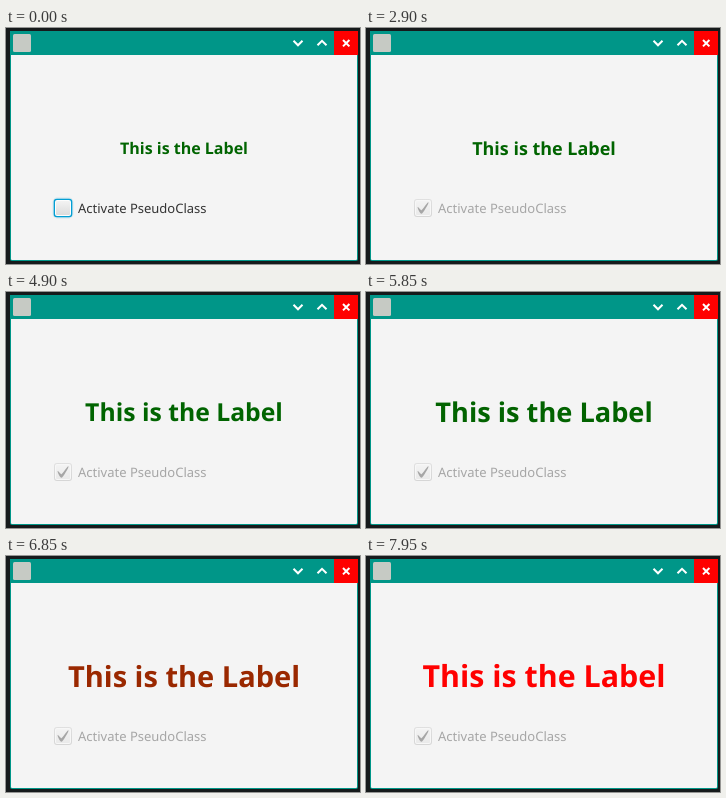
An HTML page that plays this animation: 354x236 px, repeating every 8 s.

```html
<!DOCTYPE html>
<html lang="en">
<head>
<meta charset="utf-8">
<title>Label transition</title>
<style>
  html, body { margin: 0; width: 100%; height: 100%; overflow: hidden; background: #161a1b; }
  svg { display: block; width: 100vw; height: 100vh; }
  text { font-family: "Noto Sans", "Open Sans", sans-serif; text-rendering: geometricPrecision; }
  #label { font-weight: 700; text-anchor: middle; }
  .caption { font-size: 13px; fill: #333; }
  .glyph { fill: none; stroke: #fff; stroke-width: 2; }
  .checked { opacity: .4; }
  .focus, .tick { display: none; }
  #check:not(.checked) .focus, .checked .tick { display: inline; }
</style>
</head>
<body>
<svg viewBox="0 0 354 236">
  <defs>
    <linearGradient id="edge" x2="0" y2="1">
      <stop stop-color="#c3c3c3"/><stop offset="1" stop-color="#a9a9a9"/>
    </linearGradient>
    <linearGradient id="face" x2="0" y2="1">
      <stop stop-color="#f3f3f3"/><stop offset="1" stop-color="#dcdcdc"/>
    </linearGradient>
  </defs>

  <!-- window -->
  <path d="M4 3H352V231a2 2 0 0 1-2 2H6a2 2 0 0 1-2-2z" fill="#009688"/>
  <path d="M5 27H351V231a1 1 0 0 1-1 1H6a1 1 0 0 1-1-1z" fill="#f4f4f4"/>
  <rect x="7" y="6" width="18" height="18" rx="1.5" fill="#c6cac4"/>
  <rect x="328" y="3" width="24" height="24" fill="#f00"/>
  <g class="glyph">
    <path d="M287.5 12.8l4.5 4.5 4.5-4.5"/>
    <path d="M311.5 17.3l4.5-4.5 4.5 4.5"/>
    <path d="M337 12l6.4 6.4M343.4 12L337 18.4"/>
  </g>

  <text id="label" x="178">This is the Label</text>

  <g id="check">
    <rect x="48" y="171" width="18" height="18" rx="3" fill="url(#edge)"/>
    <g class="focus">
      <rect x="46.6" y="169.6" width="20.8" height="20.8" rx="4.4" fill="#039ed3" opacity=".14"/>
      <rect x="47.7" y="170.7" width="18.6" height="18.6" rx="3.3" fill="#039ed3"/>
    </g>
    <rect x="49" y="172" width="16" height="16" rx="2" fill="#fdfdfd"/>
    <rect x="50" y="173" width="14" height="14" rx="1" fill="url(#face)"/>
    <path class="tick" fill="#333" transform="translate(51.8 175) scale(.67)"
      d="M-.25 6.08c.84-.76 4.58 4.83 5.75 4.83S14.5-1.5 15.92-.92c1.29.53-8.75 17.09-10.5 17.09C3 16.17-1.08 6.83-.25 6.08z"/>
    <text class="caption" x="72" y="185">Activate PseudoClass</text>
  </g>
</svg>

<script>
  const LOOP = 8000, TICK = 50, CLICK = 1600, START = 1730;
  const label = document.getElementById('label');
  const check = document.getElementById('check');

  const curve = (a, b, u) => 3 * a * u * (1 - u) ** 2 + 3 * b * u * u * (1 - u) + u ** 3;

  // Cubic Bezier timing, solved by bisection
  const bezier = (x1, y1, x2, y2) => x => {
    if (x <= 0) return 0;
    if (x >= 1) return 1;
    let lo = 0, hi = 1;
    for (let i = 0; i < 24; i++) {
      const mid = (lo + hi) / 2;
      if (curve(x1, x2, mid) < x) lo = mid; else hi = mid;
    }
    return curve(y1, y2, lo);
  };

  const ease = bezier(.25, .1, .25, 1);
  const easeInOut = bezier(.42, 0, .58, 1);

  function draw(now) {
    const t = Math.floor(now % LOOP / TICK) * TICK;
    const size = 16 + 16 * ease((t - START) / 10000);
    const red = easeInOut((t - START - 4000) / 2000);
    label.style.fontSize = size + 'px';
    label.setAttribute('y', Math.round(119.7 + .388 * size));
    label.style.fill = `rgb(${255 * red}, ${100 * (1 - red)}, 0)`;
    check.classList.toggle('checked', t >= CLICK);
  }

  const begin = performance.now();
  function frame() {
    draw(performance.now() - begin);
    requestAnimationFrame(frame);
  }
  frame();
</script>
</body>
</html>
```
